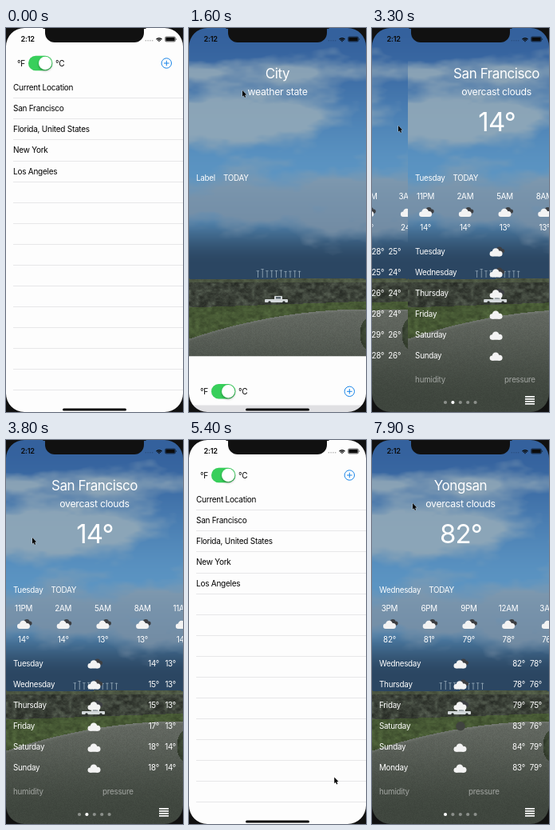
An HTML page with a canvas for the animation above (8 s loop, 222 by 480 pixels).

```html
<!DOCTYPE html>
<html lang="en">
<head>
<meta charset="utf-8">
<title>Weather</title>
<style>
html, body { margin: 0; width: 100%; height: 100%; overflow: hidden; background: #111; }
canvas { display: block; width: 222px; height: 480px; }
</style>
</head>
<body>
<canvas id="stage" width="222" height="480"></canvas>
<script>
const W = 222, H = 480, LOOP = 8000, ROW = 26.08;
const ctx = document.getElementById('stage').getContext('2d');

const places = ['Current Location', 'San Francisco', 'Florida, United States', 'New York', 'Los Angeles'];
const week = ['Sunday', 'Monday', 'Tuesday', 'Wednesday', 'Thursday', 'Friday', 'Saturday'];
const blank = { city: 'City', state: 'weather state', label: 'Label' };

// Temperatures are kept in Celsius and converted for display
const yongsan = {
  city: 'Yongsan', state: 'overcast clouds', label: 'Wednesday', day: 3, hour: 15,
  hourly: i => 27.9 - 0.86 * i, clearNight: 3,
  highs: [27.8, 25.4, 26.1, 28.3, 28.9, 28.3], lows: [25.4, 24.4, 23.9, 24.4, 26.1, 26.1]
};
const sanFran = {
  city: 'San Francisco', state: 'overcast clouds', label: 'Tuesday', day: 2, hour: 23,
  hourly: i => 13.2 + 0.15 * (i - 2.5) ** 2,
  highs: [14, 15, 15, 17, 18, 18], lows: [13, 13, 13, 13, 14, 14]
};

// Pointer moves: start and end time, then where it arrives
const moves = [
  [100, 500, 67, 78], [1900, 2400, 147, 102], [2750, 3200, 33, 122],
  [3950, 4600, 198, 466], [5200, 6200, 48, 42], [6870, 7000, 51, 79]
];

const clamp = v => Math.max(0, Math.min(1, v));
const mix = (a, b, k) => a + (b - a) * k;
const blend = (a, b, k) => a.map((v, i) => mix(v, b[i], k));
const smooth = (t, a, b) => { const u = clamp((t - a) / (b - a)); return u * u * (3 - 2 * u); };

// Critically damped spring used for the sliding sheet
function spring(ms) {
  if (ms <= 0) return 0;
  if (ms > 450) return 1;
  const u = ms * 0.01826;
  return 1 - (1 + u) * Math.exp(-u);
}

function pointer(t) {
  let pos = [44, 396];
  for (const [from, to, ...end] of moves) pos = blend(pos, end, smooth(t, from, to));
  return pos;
}

function text(s, x, y, size, color = '#fff', align = 'left', weight = 400) {
  ctx.font = `${weight} ${size}px Inter, "Liberation Sans", sans-serif`;
  ctx.letterSpacing = -0.025 * size + 'px';
  ctx.textAlign = align;
  ctx.fillStyle = color;
  ctx.fillText(s, x, y + size * 0.36);
  return ctx.measureText(s).width;
}

function pill(c, x, y, w, h, color, r = h / 2) {
  c.fillStyle = color;
  c.beginPath();
  c.roundRect(x, y, w, h, r);
  c.fill();
}

function disc(c, x, y, r, color) {
  c.fillStyle = color;
  c.beginPath();
  c.arc(x, y, r, 0, 7);
  c.fill();
}

// Smooth value noise, summed over octaves
function hash(x, y) {
  const s = Math.sin(x * 127.1 + y * 311.7) * 43758.5453;
  return s - Math.floor(s);
}
function noise(x, y) {
  const i = Math.floor(x), j = Math.floor(y);
  const u = smooth(x - i, 0, 1), v = smooth(y - j, 0, 1);
  return mix(mix(hash(i, j), hash(i + 1, j), u), mix(hash(i, j + 1), hash(i + 1, j + 1), u), v);
}
function fbm(x, y) {
  let sum = 0;
  for (let k = 1; k <= 8; k *= 2) sum += noise(x * k, y * k + k) / k;
  return sum / 1.875;
}
const bump = (v, mid, width) => Math.exp(-(((v - mid) / width) ** 2));

function skyColor(x, y) {
  const high = blend([52, 97, 157], [91, 148, 194], smooth(y, 0, 190));
  const sky = blend(high, [43, 70, 98], smooth(y, 215, 295));
  const cloud = blend([150, 171, 184], [122, 144, 165], smooth(y, 120, 230));
  const cover = 0.55 * bump(y, 52, 18) + bump(y, 108, 36) * (1 - 0.6 * smooth(x, 110, 210)) + 0.9 * bump(y, 218, 36);
  return blend(sky, cloud, 0.85 * clamp((fbm(x / 60, y / 28) + cover - 0.75) * 2.2));
}

function groundColor(x, y) {
  const grassTop = 349 - x * 0.035;
  const roadTop = 351 + 37 * (1 - x / W) ** 2;
  const grain = mix(0.72, 1.28, fbm(x / 5, y / 4));
  if (y < 318) return [76, 86, 66].map(v => v * grain);
  if (y < grassTop) return [59, 65, 56].map(v => v * grain * grain);
  if (y < roadTop) return [70, 88, 52].map(v => v * grain);
  const bush = ((x - 225) / 11) ** 2 + ((y - 382) / 20) ** 2 < 1;
  if (bush) return [54, 64, 48].map(v => v * grain);
  const road = blend([101, 106, 99], [63, 70, 62], smooth(y, 335, 470));
  return road.map(v => v * mix(0.95, 1.05, hash(x, y)) + 16 * bump(y, roadTop, 2.5));
}

function makePhoto() {
  const photo = document.createElement('canvas');
  photo.width = W;
  photo.height = H;
  const c = photo.getContext('2d');
  const img = c.createImageData(W, H);
  for (let y = 0; y < H; y++) {
    for (let x = 0; x < W; x++) {
      const rgb = y < 313 + Math.sin(x / 35) ? skyColor(x, y) : groundColor(x, y);
      img.data.set([...rgb, 255], (y * W + x) * 4);
    }
  }
  c.putImageData(img, 0, 0);

  // Wind turbines
  for (let i = 0; i < 10; i++) {
    const x = 86 + i * 5.8, y = 301 + 3 * hash(i, 1);
    pill(c, x, y, 0.8, 312 - y, '#9aaebd', 0);
    pill(c, x - 1.5, y, 3.5, 0.7, '#9aaebd', 0);
  }

  // Truck
  pill(c, 95, 339, 29, 4, '#d4d9db', 1);
  pill(c, 107, 335, 10, 5, '#d4d9db', 1);
  pill(c, 109, 336, 6, 2.5, '#59656d', 0);
  for (const x of [101, 119]) disc(c, x, 343, 1.7, '#292e2b');
  return photo;
}
const photo = makePhoto();

function cloud(x, y, k, color) {
  disc(ctx, x - 5 * k, y + 1.8 * k, 3.4 * k, color);
  disc(ctx, x - 0.5 * k, y - k, 4.6 * k, color);
  disc(ctx, x + 4.7 * k, y + 1.5 * k, 3.7 * k, color);
  pill(ctx, x - 6 * k, y, 12 * k, 5.2 * k, color, 2 * k);
}

function icon(x, y, broken) {
  if (broken) cloud(x + 4, y - 2, 0.72, '#3d3f43');
  cloud(x - 0.5, y + 1, 0.95, '#f3f3f3');
}

function clock(hour) {
  const h = hour % 24;
  return (h % 12 || 12) + (h < 12 ? 'AM' : 'PM');
}

function weather(p, fahrenheit) {
  const deg = c => Math.round(fahrenheit ? c * 1.8 + 32 : c) + '°';
  ctx.drawImage(photo, 0, 0);
  text(p.city, 111, 57, 17, '#fff', 'center');
  text(p.state, 111, 80, 12.3, '#fff', 'center');
  const w = text(p.label, 9, 187, 9.8);
  text('TODAY', 9 + w + 10, 187, 9.8);
  if (!p.hourly) return;

  text(deg(p.hourly(0)), 111.5, 117, 33, '#fff', 'center');
  for (let i = 0; i < 5; i++) {
    const x = 22 + i * 49.7;
    text(clock(p.hour + 3 * i), x, 210.5, 9.8, '#fff', 'center');
    icon(x + 0.5, 230, true);
    text(deg(p.hourly(i)), x, 249, 9.8, '#fff', 'center');
  }
  p.highs.forEach((high, i) => {
    const y = 279.5 + i * ROW;
    text(week[(p.day + i) % 7], 9, y, 9.8);
    if (i === p.clearNight) disc(ctx, 111, y, 5.8, '#40433f');
    else icon(111, y, i < 3);
    text(deg(high), 192, y, 9.8, '#fff', 'right');
    text(deg(p.lows[i]), 213, y, 9.8, '#fff', 'right');
  });
  text('humidity', 9, 439.5, 9.8, '#ffffff80');
  text('pressure', 121, 439.5, 9.8, '#ffffff80');
}

function pages(t) {
  const drag = 147 - pointer(Math.min(t, 3200))[0];
  const settle = 1 - (1 - clamp((t - 3200) / 400)) ** 3;
  const scroll = t > 2750 && t < 7000 ? mix(drag, W, settle) : 0;
  [t < 1950 ? blank : yongsan, sanFran].forEach((p, i) => {
    const x = i * W - scroll;
    if (x <= -W || x >= W) return;
    ctx.save();
    ctx.translate(x, 0);
    ctx.beginPath();
    ctx.rect(0, 0, W, H);
    ctx.clip();
    weather(p, t > 6500);
    ctx.restore();
  });

  const active = Math.round(scroll / W);
  for (let i = 0; i < 5; i++) disc(ctx, 92 + i * 9.4, 468, 2.1, i === active ? '#fff' : '#ffffff66');
  for (let i = 0; i < 4; i++) pill(ctx, 192, 460 + i * 3, 12, 1.7, '#fff', 0);
}

function toggle(t) {
  const on = 1 - smooth(t, 6300, 6600);
  pill(ctx, 28, 34.8, 30.4, 18.4, '#e2e2e4');
  pill(ctx, 29, 35.8, 28.4, 16.4, '#fff');
  ctx.globalAlpha = on;
  pill(ctx, 28, 34.8, 30.4, 18.4, '#38cf5b');
  ctx.globalAlpha = 1;
  ctx.save();
  ctx.shadowColor = '#0005';
  ctx.shadowBlur = 3;
  ctx.shadowOffsetY = 1.5;
  disc(ctx, 37.4 + 11.8 * on, 44, 8.2, '#fff');
  ctx.restore();
}

function sheet(t, y) {
  ctx.save();
  ctx.translate(0, y);
  pill(ctx, 0, 0, W, H, '#fdfdfd', 0);
  const selected = (t >= 700 && t < 3000) || t >= 7430;
  if (selected) pill(ctx, 0, 61.3, W, ROW, '#e0e0e3', 0);
  text('°F', 14, 44, 10, '#000');
  text('°C', 62, 44, 10, '#000');
  toggle(t);

  ctx.strokeStyle = '#1784e8';
  ctx.lineWidth = 1;
  ctx.beginPath();
  ctx.arc(201.3, 44, 6.2, 0, 7);
  ctx.stroke();
  pill(ctx, 198, 43.5, 6.6, 1, '#1784e8', 0);
  pill(ctx, 200.8, 40.7, 1, 6.6, '#1784e8', 0);

  places.forEach((s, i) => text(s, 9, 74.6 + i * ROW, 10, '#000'));
  for (let i = 0; i < 15; i++) pill(ctx, 9, Math.round(87.3 + i * ROW), W - 9, 0.8, '#e1e1e3', 0);
  ctx.restore();
}

function statusBar(listUp) {
  const ink = '#0b0b0b';
  text('2:12', 18.5, 14, 9.2, ink, 'left', 600);
  for (let i = 0; i < 4; i++) disc(ctx, 175.3 + i * 2.8, 15.8, 0.8, listUp ? '#aaa' : '#0003');
  ctx.strokeStyle = ink;
  ctx.lineWidth = 1.4;
  for (let r = 0.7; r < 7; r += 2.1) {
    ctx.beginPath();
    ctx.arc(192, 17.6, r, -Math.PI * 0.75, -Math.PI * 0.25);
    ctx.stroke();
  }
  pill(ctx, 199.2, 10.5, 13.6, 7, '#0008', 2);
  pill(ctx, 200.6, 11.9, 10.8, 4.2, ink, 1);
  pill(ctx, 213.2, 12.9, 0.9, 2.2, '#0008', 0.4);
}

function bezel() {
  ctx.fillStyle = '#111';
  ctx.beginPath();
  ctx.rect(0, 0, W, H);
  ctx.roundRect(0, 0, W, H, 23);
  ctx.fill('evenodd');
  pill(ctx, 49, -12, 124, 30, '#111', 12);
  pill(ctx, 46, -2, 130, 3, '#111');
}

function arrow(x, y) {
  ctx.save();
  ctx.translate(x, y);
  ctx.scale(0.9, 0.9);
  const shape = new Path2D('M0 0V8.6L1.9 6.9 3.2 9.9 4.6 9.3 3.3 6.4 5.8 6.2Z');
  ctx.lineWidth = 1;
  ctx.strokeStyle = '#fff9';
  ctx.stroke(shape);
  ctx.fillStyle = '#000';
  ctx.fill(shape);
  ctx.restore();
}

function draw(t) {
  const y = H * (spring(t - 1414) - spring(t - 4874.5) + spring(t - 7430));
  const listUp = y < H - 0.5;
  if (y > 0.1) pages(t);
  if (listUp) sheet(t, y);
  statusBar(y < 15);
  if (listUp) pill(ctx, 71, 475.4, 80, 3, '#0b0b0b');
  bezel();
  if (t >= 100) arrow(...pointer(t));
}

const start = performance.now();
function tick() {
  draw((performance.now() - start) % LOOP);
  requestAnimationFrame(tick);
}
tick();
</script>
</body>
</html>
```
